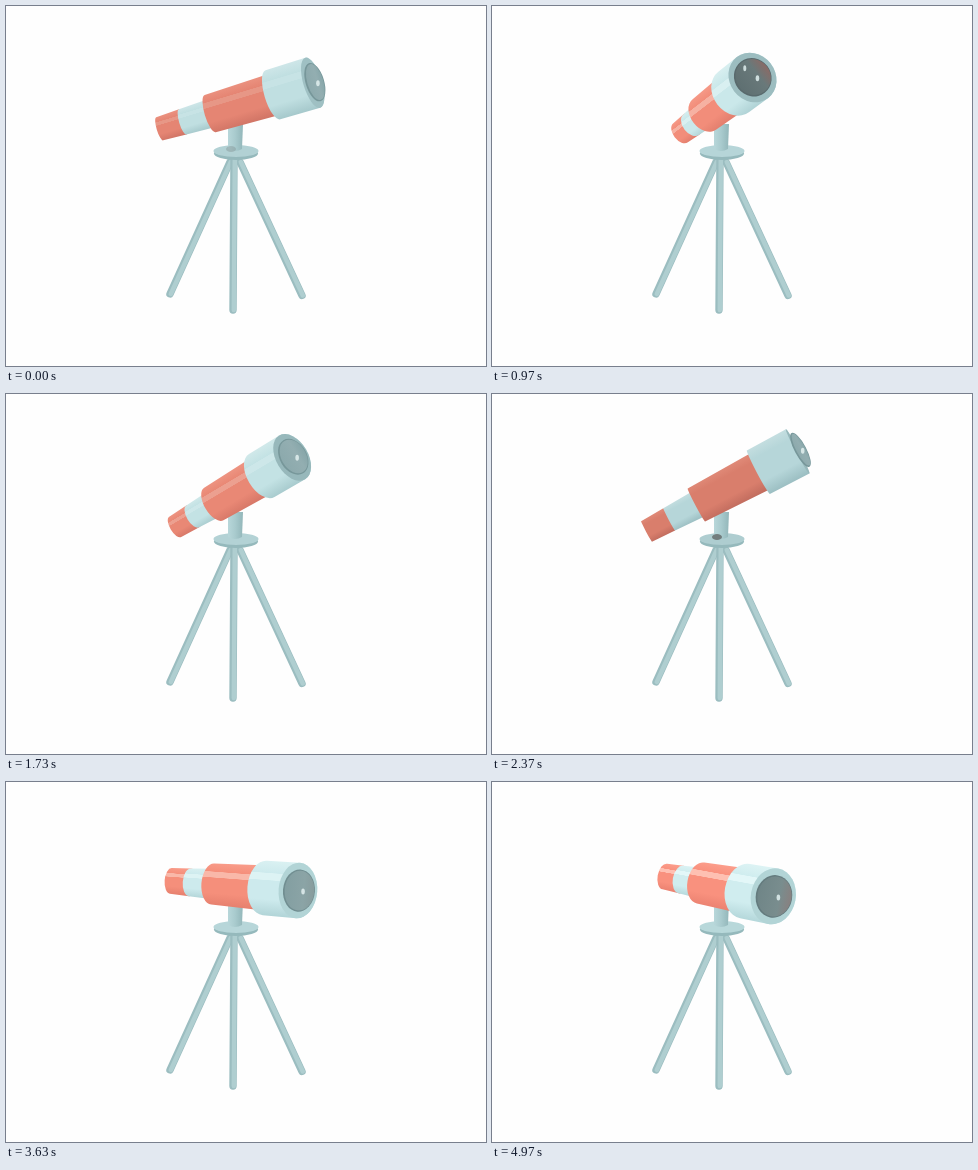
These frames come from a looping animation (480x360 px, 5000 ms). An HTML page with a canvas:

```html
<!DOCTYPE html>
<html lang="en">
<head>
<meta charset="utf-8">
<title>Telescope</title>
<style>
html, body { margin: 0; height: 100%; overflow: hidden; background: #fefefe; }
canvas { display: block; }
</style>
</head>
<body>
<canvas id="stage" width="480" height="360"></canvas>
<script>
const ctx = document.getElementById('stage').getContext('2d');
const LOOP = 5000, LENGTH = 170;
const PIVOT = { x: 219.5, y: 103, share: .43 };

// where the tube points: [time, offset from eyepiece to lens], eased between
const AIM_X = [[0, 153], [1035, 71], [2250, 151], [3070, 153], [4330, 84], [5900, 153]];
const AIM_Y = [[0, -46], [2900, -83], [3960, 42], [5900, 0]];

const PARTS = [
  { from: 0, to: .15, r0: 12.5, r1: 13.5, orange: true },
  { from: .15, to: .35, r0: 13.5, r1: 15, orange: false },
  { from: .33, to: .76, r0: 20, r1: 22, orange: true },
  { from: .74, to: 1, r0: 26.5, r1: 27, orange: false }
];

// upper side, middle, lower side and shine, each as [dim, bright]
const ORANGE = [
  [[224, 138, 120], [253, 160, 142]],
  [[217, 126, 108], [250, 146, 126]],
  [[193, 108, 94], [235, 130, 112]],
  [[217, 126, 108], [255, 194, 180]]
];
const PALE = [
  [[196, 222, 224], [222, 244, 245]],
  [[182, 214, 217], [209, 238, 240]],
  [[155, 190, 194], [181, 216, 219]],
  [[182, 214, 217], [228, 248, 249]]
];

const clamp = v => Math.max(0, Math.min(1, v));
const mix = (a, b, f) => `rgb(${a.map((v, i) => Math.round(v + (b[i] - v) * f))})`;

function easeAlong(stops, t) {
  const i = stops.findIndex(s => s[0] > t);
  const [t0, a] = stops[i - 1], [t1, b] = stops[i];
  return a + (b - a) * (1 - Math.cos(Math.PI * (t - t0) / (t1 - t0))) / 2;
}

function oval(x, y, rx, ry, fill) {
  ctx.fillStyle = fill;
  ctx.beginPath();
  ctx.ellipse(x, y, rx, ry, 0, 0, 7);
  ctx.fill();
}

function blend(x0, y0, x1, y1, stops) {
  const g = ctx.createLinearGradient(x0, y0, x1, y1);
  stops.forEach(([at, color]) => g.addColorStop(at, color));
  return g;
}

function leg(x0, y0, x1, y1) {
  const line = (width, color, dx) => {
    ctx.strokeStyle = color;
    ctx.lineWidth = width;
    ctx.beginPath();
    ctx.moveTo(x0 + dx, y0);
    ctx.lineTo(x1 + dx, y1);
    ctx.stroke();
  };
  line(7.4, '#9bbdc0', 0);
  line(4.5, '#afced0', .8);
}

function drawStand(light, open) {
  ctx.lineCap = 'round';
  leg(224, 156, 164, 288);
  leg(234, 156, 296, 289.5);
  leg(228, 153, 227, 304);
  oval(230, 147.5, 22, 6.5, '#95b9bc');
  oval(230, 145, 22.5, 6, mix([174, 205, 208], [184, 216, 218], light));
  ctx.fillStyle = blend(220, 0, 238, 0, [[0, '#bcdadd'], [.5, '#a9cbce'], [1, '#90b4b7']]);
  ctx.beginPath();
  ctx.moveTo(222, 118);
  ctx.lineTo(237, 118);
  ctx.lineTo(236, 143);
  ctx.quadraticCurveTo(229, 147, 222, 143);
  ctx.fill();
  oval(225, 143, 5, 3, `rgba(105,112,112,${clamp((.5 - open) * 2)})`);
}

function drawPart({ from, to, r0, r1, orange }, len, open, light, scale) {
  const x0 = from * len, x1 = to * len;
  r0 *= scale;
  r1 *= scale;
  const squash = s => open * (.7 + .3 * s);
  const [top, mid, low, shine] = (orange ? ORANGE : PALE).map(([a, b]) => mix(a, b, light));
  ctx.fillStyle = blend(0, -r1, 0, r1, [
    [0, top], [.22, mid], [.23, shine], [.35, shine], [.36, mid], [.7, mid], [1, low]
  ]);
  ctx.beginPath();
  ctx.ellipse(x0, 0, r0 * squash(from), r0, 0, Math.PI / 2, Math.PI * 1.5);
  ctx.lineTo(x1, -r1);
  ctx.ellipse(x1, 0, r1 * squash(to), r1, 0, -Math.PI / 2, Math.PI / 2);
  ctx.fill();
}

function drawLens(len, open, lower, R, angle) {
  oval(len, 0, R * open, R, mix([151, 184, 187], [178, 212, 214], lower));
  const r = R * .76, rx = r * Math.hypot(open, .3), x = len + (1 - open) * 3.5;
  const dark = clamp((open - .65) * 4);
  oval(x, 0, rx, r, mix([119, 151, 154], [87, 104, 107], dark));
  oval(x + .5, 0, rx - 1.2, r - 1.2, blend(x - rx, 0, x + rx, 0, [
    [0, mix([139, 169, 172], [92, 108, 110], dark)],
    [.65, mix([147, 174, 177], [103, 118, 119], dark)],
    [1, mix([134, 166, 169], [139, 103, 98], dark)]
  ]));
  ctx.save();
  ctx.translate(x, 0);
  ctx.rotate(-angle);
  oval(2 + 3 * open, 1, 1.8, 3, 'rgba(226,240,240,.85)');
  oval(-8, -9, 1.5, 3, `rgba(226,240,240,${clamp((open - .8) * 12) * (1 - lower)})`);
  ctx.restore();
}

function draw(now) {
  const t = Math.floor((now % LOOP) * .03) / .03;
  const dx = easeAlong(AIM_X, t), dy = easeAlong(AIM_Y, t);
  const len = Math.hypot(dx, dy), angle = Math.atan2(dy, dx);
  const open = 1.05 * Math.sqrt(Math.max(.004, 1 - (len / LENGTH) ** 2));
  const light = clamp(open * .8 + (dy + 67) / 260);
  const R = 27.5 + dy * .03;

  ctx.fillStyle = '#fefefe';
  ctx.fillRect(0, 0, 480, 360);
  drawStand(light, open);
  ctx.save();
  ctx.translate(PIVOT.x - dx * PIVOT.share, PIVOT.y - dy * PIVOT.share);
  ctx.rotate(angle);
  PARTS.forEach(p => drawPart(p, len, open, light, R / 27));
  drawLens(len, open, clamp((dy + 67) / 70), R, angle);
  ctx.restore();
}

const start = performance.now();
function tick() {
  draw(performance.now() - start);
  requestAnimationFrame(tick);
}
tick();
</script>
</body>
</html>
```
